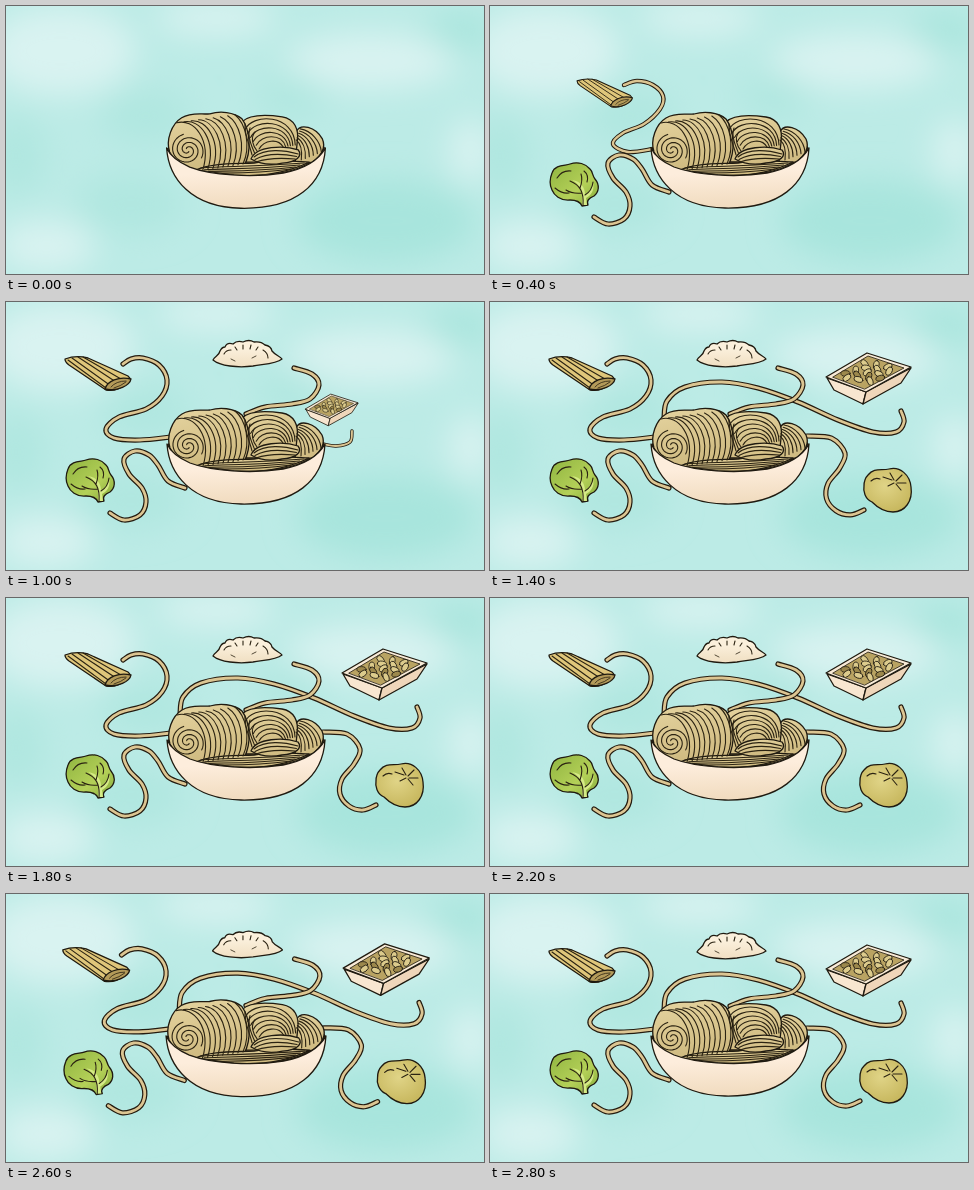
Animation, 478 px wide and 268 px high, one loop 3 s. Source, as an HTML page:

```html
<!DOCTYPE html>
<html lang="en">
<head>
<meta charset="utf-8">
<title>Noodle bowl</title>
<style>
  html, body { margin: 0; width: 100%; height: 100%; overflow: hidden; background: #bcebe6; }
  svg { display: block; width: 100vw; height: 100vh; }
  .ink { stroke: #1f1a10; stroke-width: 1.3; stroke-linejoin: round; stroke-linecap: round; }
  .line { fill: none; stroke: #2b2312; stroke-width: 1.1; stroke-linecap: round; stroke-linejoin: round; }
  .thin { stroke-width: .8; }
  .edge, .core { fill: none; stroke-linecap: round; }
  .edge { stroke: #241b0f; }
  .core { stroke: #dcc592; }
</style>
</head>
<body>
<svg viewBox="0 0 478 268" preserveAspectRatio="none">
  <defs>
    <filter id="soft" x="-60%" y="-60%" width="220%" height="220%"><feGaussianBlur stdDeviation="16"/></filter>
    <linearGradient id="clay" x1="0" y1="0" x2="0.1" y2="1">
      <stop offset=".45" stop-color="#fdeddc"/><stop offset="1" stop-color="#f1dcc0"/>
    </linearGradient>
    <linearGradient id="dough" x1="0" y1="0" x2=".3" y2="1">
      <stop offset="0" stop-color="#e5d4a0"/><stop offset="1" stop-color="#cfba80"/>
    </linearGradient>
    <linearGradient id="leaf" x1="0" y1="0" x2="1" y2="1">
      <stop offset="0" stop-color="#8fb440"/><stop offset=".6" stop-color="#b4d058"/><stop offset="1" stop-color="#84aa3a"/>
    </linearGradient>
    <radialGradient id="skin" cx=".45" cy=".4" r=".65">
      <stop offset="0" stop-color="#e0d487"/><stop offset="1" stop-color="#c6b65c"/>
    </radialGradient>
    <linearGradient id="wrap" x1="0" y1="0" x2="0" y2="1">
      <stop offset=".3" stop-color="#fbf0dc"/><stop offset="1" stop-color="#f0dfc2"/>
    </linearGradient>
  </defs>
  <rect width="478" height="268" fill="#bcebe6"/>
  <g id="clouds" filter="url(#soft)"></g>

  <g id="scene">
    <g id="strands"></g>

    <g id="bowl">
      <path class="ink" fill="#a8935c" d="M162 143C170 130 310 125 318 142Q305 168 240 171Q175 168 162 143Z"/>
      <path class="ink" fill="url(#dough)" d="M290 126C294 117 309 121 316 133C319 140 317 148 306 156L286 160Z"/>
      <path class="ink" fill="url(#dough)" d="M236 116C244 108 262 109 276 111C288 113 293 123 291 136L289 156H238Z"/>
      <path class="ink" fill="url(#dough)" d="M164 146C160 134 166 118 176 112C186 106 196 109 204 108C214 105 228 106 236 113C244 124 246 145 238 160L198 167Q172 162 164 146Z"/>
      <path class="ink" fill="url(#dough)" d="M190 164C205 157 226 158 248 157C270 152 282 156 303 156Q270 172 228 169Z"/>
      <path class="ink" fill="url(#dough)" d="M245 153C250 140 278 139 292 144C297 150 290 156 276 157C262 160 252 157 245 153Z"/>
      <g id="nest"></g>
      <path class="ink" fill="url(#clay)" d="M161 142C163 172 185 201 235 202C290 203 317 178 319 142C312 155 297 163 277 167C245 172 205 169 184 161Q166 153 161 142Z"/>
    </g>

    <g id="cabbage">
      <path class="ink" fill="url(#leaf)" d="M62 167C65 158 76 160 80 158C88 155 96 158 100 163C103 166 102 169 105 173C110 179 109 186 104 190C99 192 96 195 98 199L92 200C90 195 86 194 80 194C70 195 64 189 62 184C59 178 60 172 62 167Z"/>
      <path fill="#d5ea86" d="M92 199C93 186 90 178 82 174C91 175 95 182 95 188C100 186 102 182 103 177C105 185 100 190 96 192L97 199Z"/>
      <path class="line" d="M93 199C94 186 90 179 80 175M95 189Q102 185 103 176M90 182Q93 174 91 168M92 187Q82 188 76 184M67 172Q72 164 81 165M65 182Q72 188 79 187M94 165Q99 169 97 176"/>
    </g>

    <g id="penne">
      <path class="ink" fill="#dfc67a" d="M59 57Q70 53 82 56L122 74Q127 78 120 82Q111 90 100 88L63 63Q59 60 59 57Z"/>
      <path class="line" d="M66 56L105 84M72 55L110 80M77 55L115 77M62 58L100 86"/>
      <path class="ink" fill="#b39a59" d="M99 87C101 79 113 74 125 77C124 83 112 90 99 87Z"/>
      <path class="line thin" d="M105 85Q110 79 120 79M108 86Q115 84 120 80"/>
    </g>

    <g id="dumpling">
      <path class="ink" fill="url(#wrap)" d="M207 58C209 54 213 54 214 49Q216 45 219 45Q221 40 227 42Q231 38 237 40Q243 37 248 40Q255 39 259 43Q265 44 266 49C270 54 274 54 276 57C270 62 258 62 247 64C232 66 214 64 207 58Z"/>
      <path class="line" d="M218 52Q220 48 225 48M229 45L231 48M237 43V47M245 43L244 47M252 45L250 48M257 48Q262 51 262 56"/>
      <path class="line thin" d="M225 57L229 59M246 56L250 54"/>
    </g>

    <g id="tray">
      <path class="ink" fill="#f8e6d0" d="M337 76L344 88L373 102L376 90Z"/>
      <path class="ink" fill="#efd6ba" d="M376 90L373 102L411 81L421 66Z"/>
      <path class="ink" fill="#f8ead6" d="M336 75L377 51L421 65L376 90Z"/>
      <path class="ink thin" fill="#b9a362" d="M343 75L378 54L414 66L375 87Z"/>
      <g id="filling"></g>
    </g>

    <g id="potato">
      <path class="ink" fill="url(#skin)" d="M374 172C380 164 388 168 395 166C406 163 416 172 417 184C419 198 411 209 399 209C390 209 383 204 378 199C371 196 369 188 370 183C370 178 371 175 374 172Z"/>
      <path class="line" d="M377 178Q381 174 386 176M389 174L398 177M396 170L400 177M408 172L402 178M412 180L403 180M407 187L402 181M394 183L400 180"/>
    </g>
  </g>
</svg>
<script>
const STEP = 200, LOOP = 3000;
const $ = id => document.getElementById(id);

function add(parent, tag, attrs) {
  const el = document.createElementNS('http://www.w3.org/2000/svg', tag);
  for (const key in attrs) el.setAttribute(key, attrs[key]);
  return parent.appendChild(el);
}

// Soft watercolour patches: x, y, rx, ry, colour
const pale = '#d9f3f1', mint = '#a8e5dd', mid = '#b0e7e0';
[
  [55, 45, 75, 45, pale], [210, 12, 60, 18, pale], [365, 55, 85, 28, pale], [40, 240, 50, 26, pale],
  [465, 145, 22, 32, pale], [140, 110, 45, 28, mid], [285, 90, 35, 22, mid], [455, 25, 35, 18, mint],
  [380, 215, 90, 42, mint], [125, 198, 55, 30, mid], [10, 150, 30, 40, mid]
].forEach(([cx, cy, rx, ry, fill]) => add($('clouds'), 'ellipse', { cx, cy, rx, ry, fill }));

// Draws n cubic curves blended from curve a to curve b
function loft(a, b, n) {
  for (let i = 0; i < n; i++) {
    const p = a.map((v, k) => (v + (b[k] - v) * i / (n - 1)).toFixed(1));
    add($('nest'), 'path', { class: 'line', d: `M${p[0]} ${p[1]}C${p.slice(2)}` });
  }
}
loft([171, 117, 188, 112, 206, 134, 197, 164], [229, 109, 240, 118, 245, 140, 237, 158], 9);
loft([239, 124, 246, 107, 288, 108, 289, 139], [253, 143, 258, 134, 272, 132, 277, 141], 6);
loft([239, 118, 238, 128, 244, 140, 246, 149], [249, 126, 244, 132, 247, 140, 251, 145], 3);
loft([294, 123, 305, 125, 314, 135, 315, 146], [290, 134, 295, 138, 296, 146, 295, 154], 6);
loft([248, 151, 259, 142, 278, 144, 292, 148], [250, 156, 264, 151, 278, 152, 289, 153], 3);
loft([195, 162, 220, 160, 245, 161, 298, 157], [206, 167, 228, 167, 248, 168, 285, 163], 4);

function spiral(cx, cy, r, turns, start) {
  const points = [];
  for (let i = 0; i <= 60; i++) {
    const u = i / 60, a = start + u * turns * 2 * Math.PI, d = 2 + (r - 2) * u;
    points.push((cx + d * Math.cos(a)).toFixed(1) + ',' + (cy + d * .95 * Math.sin(a)).toFixed(1));
  }
  add($('nest'), 'polyline', { class: 'line', points: points.join(' ') });
}
spiral(182, 144, 17, 1.55, 1);
spiral(182, 144, 16, 1.45, 4);

// Pasta pieces laid over the tray's slanted opening
for (let i = 0; i < 16; i++) {
  const u = (i * .618 + .2) % 1, v = (i + .5) / 16;
  const cx = 349 + 28 * u + 29 * v, cy = 74.5 - 17 * u + 10 * v;
  add($('filling'), 'ellipse', {
    class: 'ink thin', fill: i % 5 ? '#dccb8c' : '#9c884c',
    cx, cy, rx: 4.6, ry: 2.8, transform: `rotate(${i * 47} ${cx} ${cy})`
  });
}

// Smooth path through a list of points
function curve(points) {
  const at = i => points[Math.max(0, Math.min(points.length - 1, i))];
  const handle = (i, from, to) => at(i).map((v, k) => (v + (at(to)[k] - at(from)[k]) / 6).toFixed(1));
  let d = `M${points[0]}`;
  for (let i = 0; i < points.length - 1; i++) {
    d += `C${handle(i, i - 1, i + 1)} ${handle(i + 1, i + 2, i)} ${at(i + 1)}`;
  }
  return d;
}

// Pulls the free end of a noodle by (dx, dy) while its root stays put
const pull = (points, dx, dy) => points.map(([x, y], i) => {
  const u = i / (points.length - 1);
  return [x + dx * u, y + dy * u];
});

const full = {
  cabbage: [[179, 186], [162, 179], [152, 163], [143, 153], [129, 149], [118, 157], [123, 172], [136, 186], [140, 200], [134, 213], [118, 218], [104, 211]],
  penne: [[165, 135], [134, 138], [108, 136], [100, 127], [113, 115], [140, 107], [156, 94], [161, 78], [153, 63], [137, 56], [125, 57], [117, 62]],
  dumpling: [[240, 112], [259, 105], [286, 102], [304, 97], [313, 83], [306, 72], [288, 66]],
  tray: [[174, 117], [177, 99], [195, 85], [232, 80], [268, 86], [308, 100], [348, 118], [383, 130], [406, 130], [414, 120], [411, 109]],
  potato: [[317, 134], [341, 136], [354, 151], [348, 166], [336, 181], [334, 196], [343, 208], [357, 212], [370, 207]]
};

// Each row: first step, placement of the food, points of its noodle, optional thickness
const tracks = {
  tray: [
    [5, 'translate(91 60.5) scale(.62)', [[317, 142], [330, 144], [344, 140], [346, 129]], .65],
    [6, '', full.tray]
  ],
  dumpling: [
    [3, 'translate(52 23.5) scale(.75)', [[238, 112], [249, 107], [257, 101], [254, 91]], .8],
    [4, 'translate(0 -6)', pull(full.dumpling, 4, -6)],
    [5, '', full.dumpling]
  ],
  penne: [
    [2, 'translate(37.5 27) scale(.84)', [[163, 143], [138, 146], [123, 138], [133, 127], [154, 118], [170, 103], [173, 90], [163, 79], [147, 75], [134, 79]], .85],
    [3, '', full.penne]
  ],
  cabbage: [
    [1, 'translate(-11 5)', pull(full.cabbage, -9, 6)],
    [2, '', full.cabbage]
  ],
  potato: [
    [6, 'translate(103 42) scale(.68)', [[317, 136], [335, 136], [345, 150], [341, 165], [343, 178]], .8],
    [7, 'translate(4 1)', pull(full.potato, 4, 1)],
    [8, '', full.potato]
  ]
};
const zoom = step => ({ 0: 1.005, 12: 1.017, 13: 1.012 })[step] || 1;

const noodles = {};
for (const name in tracks) {
  const g = add($('strands'), 'g', {});
  noodles[name] = { g, edge: add(g, 'path', { class: 'edge' }), core: add(g, 'path', { class: 'core' }) };
}

function show(step) {
  for (const name in tracks) {
    const row = tracks[name].filter(r => r[0] <= step).pop();
    const { g, edge, core } = noodles[name];
    $(name).style.display = g.style.display = row ? '' : 'none';
    if (!row) continue;
    const [, place, points, thick = 1] = row;
    $(name).setAttribute('transform', place);
    for (const [path, width] of [[edge, 5.2], [core, 2.8]]) {
      path.setAttribute('d', curve(points));
      path.style.strokeWidth = width * thick;
    }
  }
  $('scene').setAttribute('transform', `translate(240 150) scale(${zoom(step)}) translate(-240 -150)`);
}

let shown = -1;
function tick() {
  const step = Math.floor(performance.now() % LOOP / STEP);
  if (step !== shown) show(shown = step);
  requestAnimationFrame(tick);
}
tick();
</script>
</body>
</html>
```
